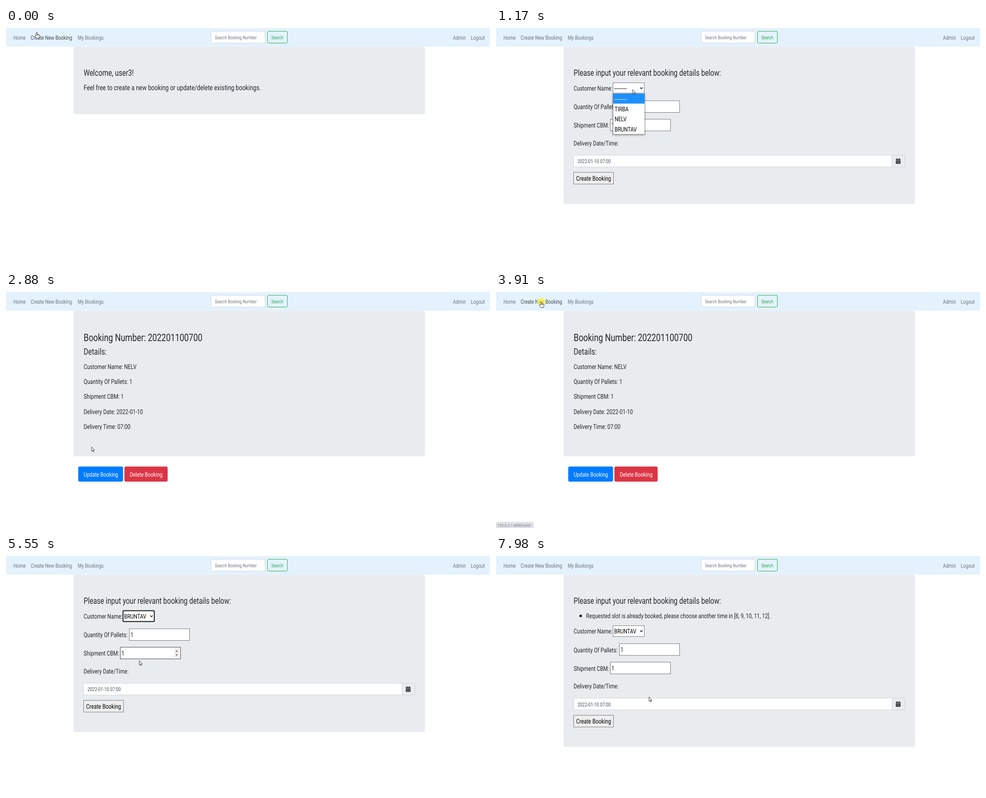
Animation of 1069 by 524 pixels, one loop 8 s. Source, as an HTML page:

```html
<!DOCTYPE html>
<html lang="en">
<head>
<meta charset="utf-8">
<title>Booking form</title>
<style>
  html, body { margin: 0; width: 100%; height: 100%; overflow: hidden; background: #fff; }
  svg { display: block; width: 1069px; height: 524px; }
  text { font-family: Roboto, "Liberation Sans", sans-serif; white-space: pre; text-rendering: geometricPrecision; }
  .status text { font-family: "Noto Sans", "Open Sans", sans-serif; }
  .off { display: none; }
</style>
</head>
<body>
<svg id="stage" viewBox="0 0 1069 524"></svg>
<script>
const LOOP = 8000;
const CONDENSE = 0.785;   // one width for the whole narrow typeface
const INK = '#212529', MUTED = '#6f777d', BORDER = '#767676';
const SIZE = { h3: 22.75, h4: 19.2, lead: 16.3, body: 14.5, button: 13.75, nav: 12.7, date: 12, small: 10.9 };
const CUSTOMERS = ['---------', 'TIRBA', 'NELV', 'BRUNTAV'];
const ROW = 22.4, LIST_TOP = 145.5;

// Drawing helpers; y of a text is its visual middle
const text = (x, y, size, str, fill = INK, narrow = CONDENSE) =>
  `<text transform="translate(${x} ${y + size * 0.37}) scale(${narrow} 1)" font-size="${size}" fill="${fill}">${str}</text>`;
const rect = (x, y, w, h, fill, stroke = 'none', r = 0, more = '') =>
  `<rect x="${x}" y="${y}" width="${w}" height="${h}" rx="${r}" fill="${fill}" stroke="${stroke}" ${more}/>`;
const path = (d, more) => `<path d="${d}" ${more}/>`;
// Group shown only during the listed "from-to" spans
const during = (spans, body, cls = '') => `<g data-on="${spans}" class="${cls}">${body}</g>`;
const panel = bottom => rect(149, 41.5, 776.5, bottom - 41.5, '#e9ecef', 'none', 4);

function nav() {
  const link = (x, str) => text(x, 21, SIZE.nav, str, MUTED);
  return rect(0, 0, 1069, 41.3, '#e3f2fd') +
    link(16.5, 'Home') + link(158.5, 'My Bookings') + link(987, 'Admin') + link(1026.5, 'Logout') +
    during('420-3650 4130-8000', text(54.5, 21, SIZE.nav + 0.2, 'Create New Booking', MUTED)) +
    during('0-420 3650-4130', text(54.5, 21, SIZE.nav + 0.2, 'Create New Booking', '#444a4d')) +
    rect(453, 7.2, 119, 26.3, '#fff', '#ced4da', 3) +
    text(461.5, 20.6, SIZE.small, 'Search Booking Number', MUTED) +
    rect(577.5, 7.2, 44, 26.3, 'none', '#28a745', 3) +
    text(586, 20.6, SIZE.small, 'Search', '#28a745');
}

function numberField(x, y, hover) {
  const spin = hover && during(hover,
    rect(x, y, 133, 26, 'none', '#444') +
    rect(x + 119, y + 3, 11, 20, '#efefef') +
    path(`M${x + 122} ${y + 10}l2.5 -3 2.5 3zm0 6l2.5 3 2.5 -3z`, 'fill="#555"'));
  return rect(x, y, 133, 26, '#fff', BORDER) + text(x + 2.5, y + 13.3, SIZE.body, '1') + (spin || '');
}

function calendar(x, y) {
  let s = rect(x, y, 10.5, 10.5, '#2b3035', 'none', 1) + rect(x + 1.7, y - 1.5, 2, 3, '#2b3035') + rect(x + 6.8, y - 1.5, 2, 3, '#2b3035');
  s += rect(x, y + 2.2, 10.5, 0.9, '#e9ecef');
  for (let i = 0; i < 2; i++) s += rect(x + 1, y + 5 + i * 2.5, 8.5, 0.7, '#b9bdc1');
  return s;
}

function dateField(addonX, icon) {
  return rect(171.5, 282.5, 731.5, 26, '#fff', '#ced4da', 2) +
    rect(addonX, 282.5, 903 - addonX, 26, '#e9ecef', '#ced4da', 1) +
    text(180, 296, SIZE.date, '2022-01-10 07:00', '#495057') + icon;
}

function fields(values, cbmHover, buttonHover, loading) {
  const button = fill => rect(171.5, 320.5, 88, 26, fill, BORDER);
  const ready = dateField(874.5, calendar(883, 291));
  const choice = values.map(([spans, i]) => during(spans, text(261, 133.6, SIZE.body - 0.3, CUSTOMERS[i], '#000'))).join('');
  return text(171.5, 133.6, SIZE.body, 'Customer Name:') +
    rect(258.5, 121.5, 69, 24, '#fff', BORDER) + choice +
    path('M318.3 132l2.8 3 2.8 -3', 'fill="none" stroke="#111" stroke-width="1.5"') +
    text(171.5, 175, SIZE.body, 'Quantity Of Pallets:') + numberField(272.5, 161.5) +
    text(171.5, 216, SIZE.body, 'Shipment CBM:') + numberField(252.5, 202.5, cbmHover) +
    text(171.5, 255.3, SIZE.body, 'Delivery Date/Time:') +
    (loading ? during(loading[0], dateField(876.5, rect(887.5, 293.5, 5, 5.5, 'none', '#777', 0, 'stroke-width=".8"'))) +
      during(loading[1], ready) : ready) +
    button('#efefef') + (buttonHover ? during(buttonHover, button('#e5e5e5')) : '') +
    text(177, 333.8, SIZE.body, 'Create Booking', '#000');
}

const formTitle = () => text(171.5, 99, SIZE.h4, 'Please input your relevant booking details below:');

function list() {
  const rows = CUSTOMERS.map((name, i) => {
    const y = LIST_TOP + i * ROW;
    return `<g class="row">${rect(259, y, 69, ROW, '#fff')}${text(262, y + 11.8, SIZE.body - 0.3, name, '#000')}</g>`;
  });
  return `<g filter="url(#shadow)">${rect(258.5, 145, 69.5, 91, '#fff', BORDER)}</g>` + rows.join('');
}

function details() {
  const lines = ['Customer Name: NELV', 'Quantity Of Pallets: 1', 'Shipment CBM: 1', 'Delivery Date: 2022-01-10', 'Delivery Time: 07:00'];
  return panel(365) +
    text(171.5, 100.6, SIZE.h3, 'Booking Number: 202201100700') +
    text(171.5, 131.8, SIZE.h4 + 0.4, 'Details:') +
    lines.map((s, i) => text(171.5, 165.2 + i * 33.3, SIZE.body + 0.2, s)).join('') +
    rect(159.5, 387.5, 99, 33.5, '#007bff', 'none', 3.5) + text(171.5, 404.8, SIZE.button, 'Update Booking', '#fff') +
    rect(261.5, 387.5, 95.5, 33.5, '#dc3545', 'none', 3.5) + text(273.5, 404.8, SIZE.button, 'Delete Booking', '#fff');
}

const pages =
  during('0-210', panel(191.3) +
    text(171.5, 99, SIZE.h4, 'Welcome, user3!') +
    text(171.5, 131.8, SIZE.lead, 'Feel free to create a new booking or update/delete existing bookings.')) +
  during('210-2880 4060-6310', panel(390.7) + formTitle() +
    fields([['210-1580 4060-5440', 0], ['1580-2880', 2], ['5440-6310', 3]],
      '5470-5620', '2260-2880 5900-6310', ['210-420 4060-4200', '420-2880 4200-6310']) +
    during('1580-2540 5470-6100', rect(258.5, 121.5, 69, 24, 'none', '#101010', 1.5, 'stroke-width="2"')) +
    during('960-1580 4530-5440', list())) +
  during('2880-4060', details()) +
  during('6310-8000', panel(424) + formTitle() +
    '<circle cx="187" cy="133" r="2.9" fill="#212529"/>' +
    text(199, 132.8, SIZE.body, 'Requested slot is already booked, please choose another time in [8, 9, 10, 11, 12].') +
    `<g transform="translate(0 33.2)">${fields([['0-8000', 3]], '7020-7220')}</g>`);

const status = during('140-560 3840-4300',
  path('M0 510.5H80q3.5 0 3.5 3.5V524H0z', 'fill="#dee1e6"') +
  text(3, 518, 8, '192.0.2.1:4000/add/', '#74787c', 1), 'status');

const outline = 'fill="#fff" stroke="#222" stroke-width=".9" stroke-linejoin="round"';
const pointer = '<g id="pointer">' +
  during('70-230 900-1060 1480-1640 2540-2740 3840-4000 4500-4690 5250-5460 6030-6210',
    '<circle r="8.8" fill="#ffed3b" opacity=".8"/>') +
  during('0-420 3650-4130', path('M-1.3 6.5V1q0 -1.2 1.2 -1.2T1.1 1V4.2l4 .8q1.2 .3 1.1 1.6L5.6 10 4.6 12.5H-1L-4.2 7.6q-.5 -1.2 .8 -1.3zM3 5v2.2M1.1 4.2v2.6', outline)) +
  during('1780-2020 7020-7220', path('M-2 -4.5h1.5l.5 .6 .5 -.6h1.5M0 -4V4.5M-2 5h1.5l.5 -.6 .5 .6h1.5', 'fill="none" stroke="#333" stroke-width=".9"')) +
  during('420-1780 2020-3650 4130-7020 7220-8000', path('M0 0V9.4L2.1 7.6 3.6 10.9 5.1 10.3 3.6 7H6.4z', outline)) +
  '</g>';

const stage = document.getElementById('stage');
stage.innerHTML = '<defs><filter id="shadow" x="-20%" y="-20%" width="140%" height="140%">' +
  '<feDropShadow dx="0" dy="1" stdDeviation="2" flood-opacity=".45"/></filter></defs>' +
  pages + nav() + status + pointer;

// Pointer stops: time, x, y
const STOPS = [
  [0, 68, 10], [70, 68, 10], [350, 103, 37], [820, 300, 132], [950, 302, 134], [1150, 302, 136],
  [1480, 288, 204], [1660, 288, 204], [1920, 291, 208], [2340, 189, 344], [2960, 189, 344],
  [3770, 100, 22], [3920, 100, 22], [4120, 118, 42], [4510, 309, 139], [4680, 309, 139],
  [5220, 300, 226], [5470, 300, 226], [6000, 211, 331], [6400, 211, 331], [6750, 330, 150],
  [7080, 300, 248], [7450, 176, 318], [7910, 338, 313], [LOOP, 338, 313]
];

function pointerAt(t) {
  const i = STOPS.findIndex(s => s[0] > t);
  const [t0, x0, y0] = STOPS[i - 1], [t1, x1, y1] = STOPS[i];
  const p = (t - t0) / (t1 - t0), k = p * p * (3 - 2 * p);
  return [x0 + (x1 - x0) * k, y0 + (y1 - y0) * k];
}

const timed = [...stage.querySelectorAll('[data-on]')].map(el => ({
  el, spans: el.dataset.on.split(' ').map(s => s.split('-').map(Number))
}));
const rows = [...stage.querySelectorAll('.row')];
const pointerEl = document.getElementById('pointer');

function draw(t) {
  for (const { el, spans } of timed) el.classList.toggle('off', !spans.some(([a, b]) => t >= a && t < b));
  const [x, y] = pointerAt(t);
  pointerEl.setAttribute('transform', `translate(${x} ${y})`);
  const active = Math.max(0, Math.min(3, Math.floor((y - LIST_TOP) / ROW)));
  rows.forEach((row, i) => {
    row.firstChild.setAttribute('fill', i === active ? '#1e90ff' : '#fff');
    row.lastChild.setAttribute('fill', i === active ? '#fff' : '#000');
  });
}

const start = performance.now();
function tick() {
  draw((performance.now() - start) % LOOP);
  requestAnimationFrame(tick);
}
tick();
</script>
</body>
</html>
```
